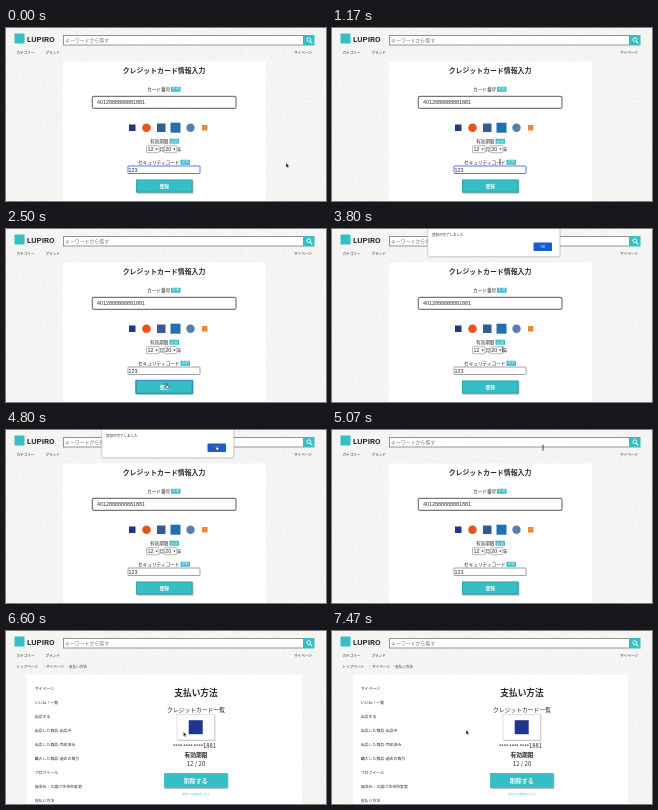
Animation of 320x173 px, one loop 7.51 s. Source, as an HTML page:

```html
<!DOCTYPE html>
<html lang="ja">
<head>
<meta charset="utf-8">
<title>カード登録</title>
<style>
html, body { margin: 0; width: 100%; height: 100%; overflow: hidden; background: #f6f6f5; }
svg { display: block; width: 320px; height: 173px; font-family: "Noto Sans CJK JP", "Noto Sans CJK", "Noto Sans", sans-serif; }
</style>
</head>
<body>
<svg id="stage" viewBox="0 0 320 173"></svg>
<script>
const LOOP = 7510, TEAL = '#35bfc4', INK = '#2b2b2b';
const $ = id => document.getElementById(id);

const rect = (x, y, w, h, fill, more = '') =>
  `<rect x="${x}" y="${y}" width="${w}" height="${h}" fill="${fill}" ${more}/>`;
const circle = (x, y, r, fill) => `<circle cx="${x}" cy="${y}" r="${r}" fill="${fill}"/>`;
// y is the vertical middle of the glyphs
const text = (x, y, size, str, more = '') =>
  `<text x="${x}" y="${y + size * .37}" font-size="${size}" fill="${INK}" ${more}>${str}</text>`;
const MID = 'text-anchor="middle"', BOLD = 'font-weight="700"';
const SANS = 'font-family="Liberation Sans, sans-serif"';
const white = 'style="fill:#fff"';

const tag = (x, y) => rect(x, y - 2.5, 9.5, 5, TEAL, 'rx=".5"') +
  text(x + 4.75, y, 3.4, '必須', `${MID} ${white}`);
const button = (x, y, w, h, size, label, edge) =>
  rect(x + .8, y + 1, w, h, '#777', 'opacity=".6"') +
  rect(x + .4, y + .4, w - .8, h - .8, TEAL, `stroke="${edge}" stroke-width=".8"`) +
  text(x + w / 2, y + h / 2, size, label, `${MID} ${BOLD} ${white}`);
const select = (x, y, value) =>
  rect(x, y - 3.5, 12.5, 7, '#fff', 'rx=".8" stroke="#888" stroke-width=".6"') +
  text(x + 1, y, 5.4, value, SANS) +
  `<path d="M${x + 8.8} ${y - .8}h2.6l-1.3 1.8z" fill="#444"/>`;

const header =
  rect(8.5, 5.5, 10, 10, TEAL) +
  text(21, 11, 8, 'LUPIRO', 'font-weight="700" font-family="Roboto, sans-serif"') +
  rect(57.5, 7.5, 240, 9.5, '#fff', 'stroke="#888" stroke-width=".9"') +
  text(59, 12.2, 4.9, 'キーワードから探す', 'style="fill:#777"') +
  rect(298, 7, 10.5, 10.5, TEAL) +
  '<path d="M304.3 13.3l2 2" stroke="#fff" stroke-width="1.1"/>' +
  '<circle cx="302.8" cy="11.7" r="1.9" fill="none" stroke="#fff" stroke-width=".9"/>' +
  text(10.5, 25, 3.6, 'カテゴリー') + text(39.5, 25, 3.6, 'ブランド') + text(288, 25, 3.6, 'マイページ');

const cards =
  rect(123, 96.5, 6.5, 6.5, '#20358c') + circle(140.5, 99.7, 4.3, '#e5531f') +
  rect(151, 95.5, 8.5, 8.5, '#355b94') + rect(164.5, 94.7, 10, 10, '#246fae') +
  circle(184.5, 99.7, 4.2, '#557fae') + rect(196, 97, 5.5, 5.5, '#ee8a35');

const form = rect(57, 33.5, 203, 140, '#fff') +
  text(158, 42.8, 6.9, 'クレジットカード情報入力', `${MID} ${BOLD}`) +
  text(141, 61.2, 4.65, 'カード番号') + tag(165, 61.2) +
  rect(86.3, 68.3, 143.7, 12, '#fff', 'rx="1.5" stroke="#777" stroke-width="1.2"') +
  text(91, 74.2, 5.4, '4012888888881881', SANS) + cards +
  text(144, 113.3, 4.6, '有効期限') + tag(163.5, 113.3) +
  select(140.5, 121.2, '12') + text(153.4, 121.2, 4.6, '月') +
  select(158.3, 121.2, '20') + text(171, 121.2, 4.6, '年') +
  text(132, 134.2, 4.65, 'セキュリティコード') + tag(174.5, 134.2) +
  rect(122, 138, 72, 7.5, '#fff', 'id="code" rx=".6"') + text(122.6, 141.8, 5.4, '123', SANS) +
  button(130, 151.5, 56.5, 13, 4.8, '登録', '#2a9ba3') +
  rect(129.8, 151.3, 56.9, 13.4, 'none', 'id="ring" rx=".8" stroke="#2586d0" stroke-width="1.1"');

const menu = ['マイページ', 'いいね！一覧', '出品する', '出品した商品-出品中', '出品した商品-売却済み',
  '購入した商品-過去の取引', 'プロフィール', '発送元・お届け先住所変更', '支払い方法'];

const payment =
  text(10.5, 36, 3.55, 'トップページ') + text(36.5, 36, 3.55, '・マイページ') + text(59.5, 36, 3.55, '・支払い方法') +
  rect(21, 44, 275, 130, '#fff') +
  menu.map((m, i) => text(28.7, 57.1 + i * 14.1, 3.95, m)).join('') +
  text(190, 61.8, 8.7, '支払い方法', `${MID} ${BOLD}`) +
  text(190, 79, 5.8, 'クレジットカード一覧', MID) +
  rect(171.8, 84.3, 37.5, 25.5, '#888', 'opacity=".6"') +
  rect(171, 83.5, 37.5, 25.5, '#fff', 'stroke="#ccc" stroke-width=".6"') +
  rect(182.7, 89.2, 14, 14, '#20358c') +
  text(167, 115.3, 4.6, '**** **** ****', BOLD) + text(197, 115, 5.8, '1881') +
  text(190, 123.6, 5.8, '有効期限', `${MID} ${BOLD}`) +
  text(190, 132.6, 6.1, '12 / 20', MID) +
  button(158, 142, 63.5, 14.8, 5.9, '削除する', TEAL) +
  text(190, 163, 2.75, '支払いの追加はこちら', `${MID} style="fill:${TEAL}"`);

const dialog =
  rect(95, -4, 134, 33, '#000', 'rx="2.5" opacity=".07"') +
  rect(95.8, -3, 132, 30.5, '#fff', 'rx="2" stroke="#bbb" stroke-width=".5"') +
  text(100, 6.2, 3.5, '登録が完了しました') +
  rect(201.5, 13.5, 18.5, 8.5, '#1a5bd0', 'rx="1"') +
  text(210.8, 17.8, 3.2, 'OK', `${MID} ${white}`);

const pointers = {
  arrow: '<path d="M0 0v4.6l1.1-1 .7 1.6.8-.4-.7-1.5h1.5z" fill="#111" stroke="#fff" stroke-width=".35"/>',
  beam: '<path d="M-1-2.6q1 0 1 .6v4q0 .6-1 .6M1-2.6q-1 0-1 .6v4q0 .6 1 .6" fill="none" stroke="#333" stroke-width=".5"/>',
  hand: '<path d="M-.9-2.2q.5-.5.9 0v1.5l1.7.4q.5.3.4.9l-.5 1.7h-2.3l-1.6-1.9q.2-.6.9 0l.5.3z" fill="#fff" stroke="#111" stroke-width=".6"/>'
};

$('stage').innerHTML = `
  <filter id="paper" x="0" y="0" width="1" height="1">
    <feTurbulence type="fractalNoise" baseFrequency=".3 .4" numOctaves="3" seed="4"/>
    <feColorMatrix values="0 0 0 0 .5  0 0 0 0 .5  0 0 0 0 .48  .2 0 0 0 -.075"/>
  </filter>
  ${rect(0, 0, 320, 173, '#f6f6f5')}${rect(0, 0, 320, 173, '#000', 'filter="url(#paper)"')}
  ${header}<g id="form">${form}</g><g id="payment">${payment}</g><g id="dialog">${dialog}</g>
  <g id="pointer">${Object.entries(pointers).map(([k, p]) => `<g id="${k}">${p}</g>`).join('')}</g>`;

// pointer stops: time, x, y
const path = [
  [30, 280, 135], [1170, 168, 134], [1330, 168, 134], [1730, 161, 157], [2870, 161, 157],
  [3470, 167, 130], [3670, 167, 130], [4400, 211, 18], [6200, 211, 17],
  [6870, 159, 147], [7000, 159, 147], [7450, 134, 99], [LOOP, 134, 99]
];

function pointerAt(t) {
  const i = path.findIndex(p => p[0] > t);
  if (i < 1) return path[0].slice(1);
  const [t0, x0, y0] = path[i - 1], [t1, x1, y1] = path[i];
  const u = (t - t0) / (t1 - t0), e = u * u * (3 - 2 * u);
  return [x0 + (x1 - x0) * e, y0 + (y1 - y0) * e];
}

const show = (id, on) => $(id).setAttribute('display', on ? 'inline' : 'none');

function pointerKind(t, x, y, open) {
  const inside = (l, top, r, b) => x > l && x < r && y > top && y < b;
  if (open) return inside(201, 13, 220, 22) ? 'hand' : inside(155, 108, 185, 137) ? 'beam' : 'arrow';
  if (t < 6070 && inside(130, 151, 186, 164)) return 'hand';
  if (inside(57, 7, 297, 18) || t < 6070 && inside(121, 131, 194, 146)) return 'beam';
  return 'arrow';
}

function draw(now) {
  const t = now % LOOP, open = t >= 2870 && t < 4930, focused = t < 1930;
  show('form', t < 6070);
  show('payment', t >= 6070);
  show('dialog', open);
  $('dialog').setAttribute('opacity', Math.min(1, (t - 2800) / 200));
  show('ring', t >= 1930 && t < 2870);
  $('code').setAttribute('stroke', focused ? '#5a7be6' : '#888');
  $('code').setAttribute('stroke-width', focused ? 1 : .8);
  const [x, y] = pointerAt(t), kind = pointerKind(t, x, y, open);
  $('pointer').setAttribute('transform', `translate(${x} ${y})`);
  Object.keys(pointers).forEach(k => show(k, k === kind));
  requestAnimationFrame(() => draw(performance.now() - start));
}
const start = performance.now();
draw(0);
</script>
</body>
</html>
```
